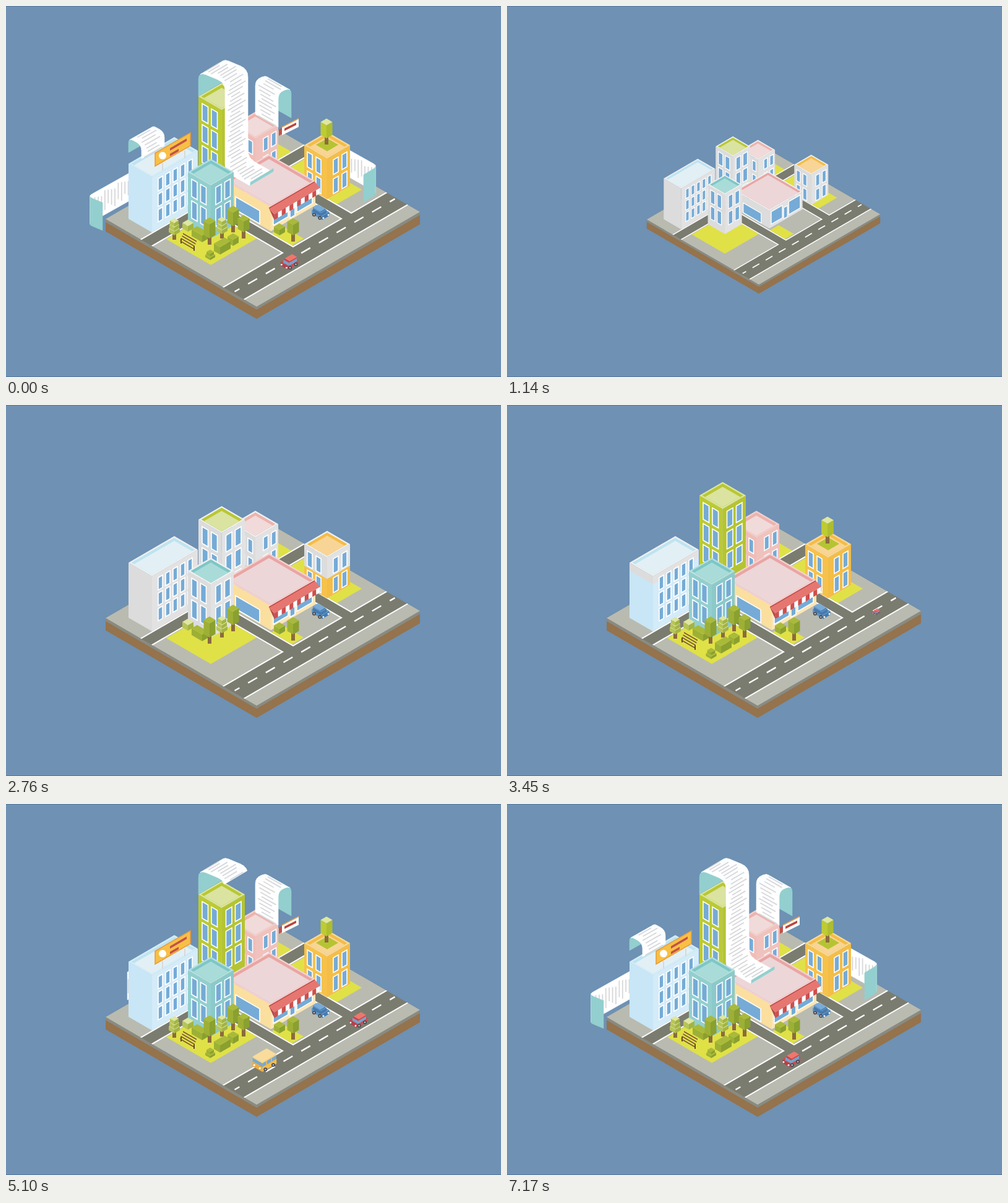
These frames come from a looping animation (800x600 px, 7200 ms). An HTML page:

```html
<!DOCTYPE html>
<html lang="en">
<head>
<meta charset="utf-8">
<title>Paper city</title>
<style>
html, body { margin: 0; width: 100%; height: 100%; overflow: hidden; background: #6e91b4; }
svg { display: block; width: 100vw; height: 100vh; }
</style>
</head>
<body>
<svg id="stage" viewBox="0 0 800 600"></svg>
<script>
const LOOP = 7200;
const K = 0.58; // isometric slope
const SPEED = 0.0536;
const stage = document.getElementById('stage');

const clamp = v => Math.max(0, Math.min(1, v));
const span = (t, from, length) => clamp((t - from) / length);
const inOut = u => u < 0.5 ? 4 * u ** 3 : 1 - 4 * (1 - u) ** 3;
const outCubic = u => 1 - (1 - u) ** 3;
const outBack = u => 1 + 2.7 * (u - 1) ** 3 + 1.7 * (u - 1) ** 2;
const mix = (a, b, u) => [a[0] + (b[0] - a[0]) * u, a[1] + (b[1] - a[1]) * u];
const times = (n, make) => Array.from({ length: n }, (_, i) => make(i)).join('');

const points = list => list.map(p => p[0].toFixed(2) + ',' + p[1].toFixed(2)).join(' ');
const poly = (list, fill, extra = '') => `<polygon points="${points(list)}" fill="${fill}" ${extra}/>`;
const line = (list, color, width, extra = '') =>
  `<polyline points="${points(list)}" fill="none" stroke="${color}" stroke-width="${width}" ${extra}/>`;
const dot = (x, y, r, fill) => `<circle cx="${x}" cy="${y}" r="${r}" fill="${fill}"/>`;
const move = (x, y, inner) => `<g transform="translate(${x} ${y})">${inner}</g>`;

// Upright rectangle on a wall; slope is K on left walls and -K on right walls.
const panel = (x, y, w, h, slope, fill, extra) =>
  poly([[x, y], [x + w, y + slope * w], [x + w, y + slope * w + h], [x, y + h]], fill, extra);

// Isometric box: front bottom corner at (0, y), reaching a to the left and b to the right.
function box(a, b, h, y, [top, left, right]) {
  return panel(-a, y - K * a - h, a, h, K, left) + panel(0, y - h, b, h, -K, right) +
    poly([[-a, y - K * a - h], [0, y - h], [b, y - K * b - h], [b - a, y - h - K * (a + b)]], top);
}

function pop(t, start, x, y, inner) {
  const u = span(t, start, 300);
  return u ? move(x, y, `<g transform="scale(${outBack(u).toFixed(3)})">${inner}</g>`) : '';
}

// ---- ground: a runs to the lower right, b to the lower left ----
const ground = (() => {
  const at = (a, b) => [425 + a - b, 191.5 + K * (a + b)];
  const area = (a0, a1, b0, b1, fill, extra) =>
    poly([at(a0, b0), at(a1, b0), at(a1, b1), at(a0, b1)], fill, extra);
  const block = (a0, a1, b0, b1) => area(a0, a1, b0, b1, '#b9bbb1', 'stroke="#fff" stroke-width="2"');
  const lawn = (...sides) => area(...sides, '#e0e147');
  const brown = '#94734d', rim = '#898b82', road = '#7b7c70';
  return `<clipPath id="top">${area(0, 244, 0, 264, road)}</clipPath>` +
    move(405, 506, box(244, 264, 15, 0, [brown, brown, brown]) + box(244, 264, 5, -15, [road, rim, rim])) +
    '<g clip-path="url(#top)">' +
    block(-50, 57, -50, 320) + block(224, 300, -50, 320) +
    [[-50, 57], [73, 151], [168, 320]].map(([b0, b1]) => block(75, 190, b0, b1)).join('') +
    line([at(205.5, 261), at(205.5, 2)], '#fff', 2.4, 'stroke-dasharray="17 16.1" stroke-dashoffset="8"') +
    lawn(77, 149, 169, 243) + lawn(154, 187, 131, 150) + lawn(77, 166, 16, 56) + lawn(20, 56, 20, 80) + '</g>';
})();

// ---- buildings ----
// Window grids start `left` and `right` pixels from the near end of each wall.
const blue = { x: 198, y: 277, wl: 38, wr: 74, h: 89, start: 3150,
  colors: ['#c8e6f6', '#d4ebf8'], rim: '#d5eef9', inner: '#bfe3f0', floor: '#e2f0f6',
  windows: { right: 10, cols: 5, rows: 3, w: 7, h: 20, dx: 12, dy: 25 } };
const mint = { x: 294, y: 290, wl: 37, wr: 37, h: 86, start: 3050,
  colors: ['#93cfcf', '#8bc9ca'], rim: '#b4e0df', inner: '#7fc6c6', floor: '#a9dcd9',
  windows: { left: 6, right: 8, cols: 2, rows: 2, w: 9, h: 28, dx: 14.5, dy: 35 } };
const green = { x: 311, y: 207, wl: 37.5, wr: 37.5, h: 93, start: 2950,
  colors: ['#bbca32', '#b5c431'], rim: '#dde69c', inner: '#b9c733', floor: '#dae3a0',
  windows: { left: 6, right: 7, cols: 2, rows: 3, w: 9.5, h: 27, dx: 15, dy: 34 } };
const pink = { x: 366, y: 214, wl: 37, wr: 37, h: 55, start: 2700,
  colors: ['#efbdb8', '#f0c2bd'], rim: '#f4cfca', inner: '#edb3ad', floor: '#f1dada',
  windows: { left: 12, right: 13, cols: 2, rows: 2, w: 7.5, h: 21, dx: 13, dy: 30 } };
const yellow = { x: 482, y: 246.5, wl: 37, wr: 37, h: 66, start: 2540,
  colors: ['#f6c24c', '#f3bd47'], rim: '#f9d996', inner: '#f5bb46', floor: '#f8d596',
  windows: { left: 5, right: 10, cols: 2, rows: 2, w: 8, h: 24, dx: 14, dy: 31 } };
const shop = { x: 353, y: 325, wl: 75, wr: 72, h: 39, start: 2200,
  colors: ['#fbdf9f', '#fce6b3'], rim: '#f3d3d2', inner: '#e9a5a3', floor: '#ecd6d8' };

const glass = (x, y, w, h, slope) =>
  panel(x, y, w, h, slope, '#75abd6', 'stroke="#fff" stroke-width="1.6"');

function windowGrid(x, y, slope, { cols, rows, w, h, dx, dy }, first) {
  if (first === undefined) return '';
  return times(cols, c => times(rows, r => {
    const off = first + c * dx;
    return glass(x + off, y + slope * off + 8 + r * dy, w, h, slope);
  }));
}

function building(b, t, grow = 0) {
  const paint = inOut(span(t, b.start, 450));
  const y = b.y - grow, h = b.h + grow, fx = b.x + b.wl;
  const ly = y - K * b.wl, ry = y - K * b.wr;
  const walls = ([left, right], p) =>
    panel(b.x, ly + h * (1 - p), b.wl, h * p, K, left) + panel(fx, y + h * (1 - p), b.wr, h * p, -K, right);
  const roof = (d, drop, fill) => poly([[b.x + d, ly + drop / 2], [b.x + b.wr, ly - K * b.wr + K * d + drop / 2],
    [fx + b.wr - d, ry + drop / 2], [fx, y - K * d + drop / 2]], fill);
  const panes = b.windows
    ? windowGrid(b.x, ly, K, b.windows, b.windows.left) + windowGrid(fx, y, -K, b.windows, b.windows.right)
    : shopFront(b, ly, fx);
  return walls(['#dcdcdd', '#e2e2e3'], 1) + walls(b.colors, paint) + panes +
    roof(0, 0, paint > 0.95 ? b.rim : '#f0f0ef') + roof(4.5, 0, b.inner) + roof(9, 5, b.floor);
}

function shopFront(b, ly, fx) {
  const right = (dx, drop, w, h) => glass(fx + dx, b.y - K * dx + drop, w, h, -K);
  return glass(b.x + 18, ly + 27 - K * 18 + K * 18, 39, 21, K) +
    right(4, 5, 24, 27) + right(31, 12, 8, 24) + right(42, 5, 25, 28);
}

function awning(p) {
  if (!p) return '';
  const x = 425, y = 327, w = 74, n = 12, strip = w / n;
  const ox = x + 8.5 * p, oy = y + 10 * p, drop = 9 * p;
  return poly([[x, y], [ox, oy], [ox, oy + drop]], '#b94745') +
    times(n, i => panel(ox + i * strip, oy - K * i * strip, strip, drop, -K, i % 2 ? '#fff' : '#cf4e4c')) +
    poly([[x, y], [x + w, y - K * w], [ox + w, oy - K * w], [ox, oy]], '#e67670') +
    line([[x, y], [x + w, y - K * w]], '#c04b49', 1.5);
}

// ---- paper strips: a rounded path swept along the vector w ----
const distance = (a, b) => Math.hypot(b[0] - a[0], b[1] - a[1]);

function rounded(keys, radius) {
  const path = [keys[0]];
  for (let i = 1; i < keys.length - 1; i++) {
    const [a, b, c] = keys.slice(i - 1, i + 2);
    const r = Math.min(radius, 0.45 * distance(a, b), 0.45 * distance(b, c));
    const p = mix(b, a, r / distance(a, b)), q = mix(b, c, r / distance(b, c));
    for (let u = 0; u <= 1; u += 0.25) path.push(mix(mix(p, b, u), mix(b, q, u), u));
  }
  return path.concat([keys.at(-1)]);
}

const strip = (w, side, back, radius, keys) => ({ w, side, back, path: rounded(keys, radius) });
const pinkSheet = strip([37, 21], 1, true, 10, [[403, 175], [403, 119], [424, 111], [424, 160]]);
const greenSheet = strip([37, -22], -1, false, 13,
  [[311, 146], [311, 106], [354, 124], [354, 268], [395, 291], [395, 285]]);
const leftSheet = strip([0, 45], -1, false, 8, [[203, 268], [132, 308], [156, 318]]);
const rightSheet = strip([0, 44], 1, false, 8, [[553, 232], [601, 259], [578, 273]]);
const roofSheet = strip([37, -21], 1, true, 9, [[219, 247], [219, 225], [198, 213], [198, 237]]);

function sheet({ path, w, side, back }, p) {
  const gap = 6.2, parts = [];
  const total = path.slice(1).reduce((sum, q, i) => sum + distance(path[i], q), 0);
  for (let i = 0, pos = 0; i < path.length - 1 && pos < total * p; i++) {
    const a = path[i], b = path[i + 1], len = distance(a, b);
    const f = Math.min(1, (total * p - pos) / len);
    const at = (u, v) => { const q = mix(a, b, u); return [q[0] + w[0] * v, q[1] + w[1] * v]; };
    const front = ((b[0] - a[0]) * w[1] - (b[1] - a[1]) * w[0]) * side > 0;
    const fill = front ? '#fff' : '#93cfcf';
    let part = poly([at(0, 0), at(f, 0), at(f, 1), at(0, 1)], fill, `stroke="${fill}" stroke-width=".6"`);
    for (let n = Math.ceil(pos / gap); front && n * gap < pos + len * f; n++) {
      const u = (n * gap - pos) / len;
      part += line([at(u, 0.12 + n * 3 % 4 * 0.05), at(u, 0.9 - n * 7 % 5 * 0.06)], '#d6d7da', 1.8);
    }
    parts.push(part);
    pos += len;
  }
  return (back ? parts.reverse() : parts).join('');
}

// ---- plants and street furniture, base at (0,0) ----
const leaf = ['#a9ba3b', '#9db035', '#8aa02f'];
const pale = ['#dfe6a0', '#b6c556', '#a3b443'];
const lime = ['#dfe79f', '#bdcb34', '#aebd30'];
const trunk = '<rect x="-3" y="-14" width="6" height="14" fill="#8c6a3e"/>';
const tree = (h, colors = leaf) => trunk + box(9.5, 9.5, h, -10, colors);
const pine = trunk + times(3, i => box(9 - i, 9 - i, 6, -7 - 7 * i, pale));
const bush = (a, b, h, colors = leaf) => box(a, b, h, 0, colors);
const shrub = bush(8, 8, 4) + box(6, 6, 4, -6, leaf);
const bench = times(2, i => line([[-11 + 21 * i, -8 + 12 * i], [-11 + 21 * i, 12 * i]], '#674728', 2)) +
  times(4, i => panel(-8 - 1.5 * i, -17 + 4 * i, 22, 2, K, '#7d5935'));

const earlyPlants = [[442, 371, bush(9, 9, 9)], [464, 381, tree(17)], [367, 366, tree(22)], [349, 376, pine],
  [329, 386, tree(23)], [294, 365, bush(9, 9, 9, pale)], [317, 382, bush(17, 9, 11)]];
const latePlants = [[384, 376, tree(17)], [272, 378, pine], [294, 384, bench],
  [367, 388, bush(9, 9, 10)], [346, 402, bush(10, 17, 12)], [330, 411, shrub]];
const planted = (list, start, gap) => list.map(([x, y, art], i) => ({ x, y, art, start: start + i * gap }));
const plants = [...planted(earlyPlants, 2300, 30), ...planted(latePlants, 2880, 70)].sort((p, q) => p.y - q.y);

const billboard = times(2, i => line([[-17 + 36 * i, -7 - 20 * i], [-17 + 36 * i, 5 - 20 * i]], '#d9d9d9', 2)) +
  panel(-29, -23, 57, 21, -K, '#f8bf45', 'stroke="#e99a37" stroke-width="1.5"') + dot(-17, -19, 6, '#fff') +
  panel(-5, -31, 27, 4, -K, '#c2514a') + panel(-5, -22, 14, 4, -K, '#c2514a');
const wallSign = panel(0, -5, 5, 10, -K, '#c2514a') +
  panel(5, -9, 27, 13, -0.5, '#fff') + line([[5, -9], [32, -23]], '#eca349', 1.5) +
  panel(9, -7, 19, 4, -0.5, '#b9463f');

// ---- vehicles, centred on (0,0), nose to the lower left ----
const wheels = (x, y, b) => times(2, i => {
  const dx = b * (0.22 + 0.55 * i);
  return dot(x + dx, y - K * dx, 3, '#4c4b50') + dot(x + dx, y - K * dx, 1.2, '#c5c7c9');
});
const car = (top, left, right, pane) =>
  move(-3, 11, box(11.5, 17, 6, 0, [right, left, right])) +
  move(-1, 5, box(9, 13, 5, 0, [right, pane, pane])) + move(0, -1, box(8, 12, 1.5, 0, [top, left, right])) +
  wheels(-3, 10, 17) + dot(-13, 3, 1.4, '#fff') + dot(-5, 8, 1.4, '#fff');
const redCar = car('#ee776c', '#b5404a', '#cf4b50', '#74a4cd');
const blueCar = `<g transform="scale(-1 1)">${car('#78abd8', '#4379ae', '#5d95c8', '#4879aa')}</g>`;
const van = move(-4, 18, box(16, 23, 8, 0, ['#f5bd4d', '#efad3d', '#f5bd4d']) +
  box(15.5, 22.5, 6, -8, ['#f9dc9c', '#76a9d1', '#76a9d1']) +
  times(2, i => panel(6 + 8 * i, -14 - K * (6 + 8 * i), 1.5, 6, -K, '#f5bd4d')) +
  box(15.5, 22.5, 2, -14, ['#f9dc9c', '#f5cf80', '#f5cf80'])) +
  wheels(-4, 17, 23) + dot(-17, 7, 1.5, '#fff') + dot(-8, 12, 1.5, '#fff');

function driven(t, start) {
  const ramp = 1430, e = Math.max(0, t - start);
  return SPEED * (e < ramp ? e * e / (2 * ramp) : e - ramp / 2);
}

function traffic(t) {
  const carX = 597 - driven(t, 3900), vanX = 425 - driven(t, 4500);
  const fall = Math.max(0, t - 6280);
  const vanY = 434 + (386 - vanX) * K + 0.0008 * fall ** 2;
  return pop(t, 3420, carX, 415 + (459 - carX) * K, redCar) +
    (vanY < 640 ? pop(t, 4300, vanX, vanY, `<g transform="rotate(${-fall * 0.05})">${van}</g>`) : '');
}

function city(t) {
  const unroll = (s, from, length, ease = inOut) => sheet(s, ease(span(t, from, length)));
  const roofLawn = box(18, 18, 0, 11, ['#b5c433', 'none', 'none']);
  return unroll(leftSheet, 4900, 750) + ground +
    unroll(rightSheet, 5500, 1500, outCubic) +
    building(pink, t) + pop(t, 3500, 441, 205, wallSign) + unroll(pinkSheet, 3810, 800) +
    building(yellow, t) + pop(t, 3080, 519, 224, roofLawn) + pop(t, 3200, 518, 224, tree(21, lime)) +
    building(blue, t) + unroll(roofSheet, 6100, 1050) + pop(t, 3450, 270, 261, billboard) +
    building(green, t, 39 * inOut(span(t, 2820, 360))) +
    building(shop, t) + awning(outCubic(span(t, 2400, 280))) +
    unroll(greenSheet, 4550, 1300) +
    building(mint, t) +
    plants.map(p => pop(t, p.start, p.x, p.y, p.art)).join('') +
    pop(t, 2420, 508, 335, blueCar) + traffic(t);
}

function render(t) {
  let out = '<rect width="800" height="600" fill="#6e91b4"/>';
  if (t < 1150) {
    const q = (t / 690) ** 4;
    out += move(-96 * q, -57 * q, city(t + LOOP));
  }
  if (t > 1000) {
    const u = (t - 1000) / 720;
    const s = u < 1 ? 1 - 2 ** (-10 * u) : 1;
    out += `<g transform="translate(413 347.5) scale(${s}) translate(-413 -347.5)">${city(t)}</g>`;
  }
  stage.innerHTML = out + '<path d="M0 .5H800M0 599.5H800" stroke="#55769b"/>';
}

const began = performance.now();
function tick() {
  render((performance.now() - began) % LOOP);
  requestAnimationFrame(tick);
}
tick();
</script>
</body>
</html>
```
